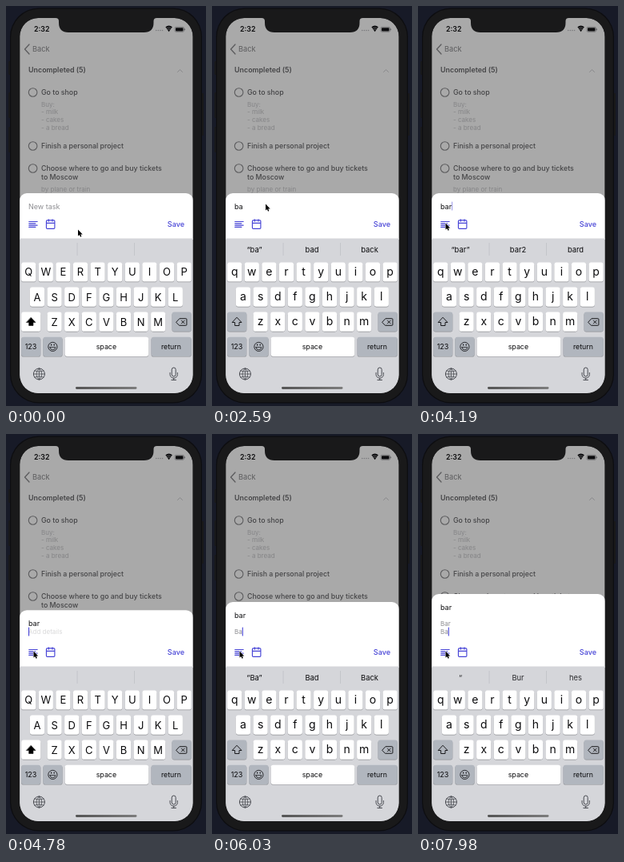
Animation of 250x500 px, one loop 8000 ms. Source, as an HTML page with a canvas:

```html
<!DOCTYPE html>
<html lang="en">
<head>
<meta charset="utf-8">
<title>Adding a task</title>
<style>
html, body { margin: 0; width: 250px; height: 500px; overflow: hidden; background: #171a27; }
canvas { display: block; width: 250px; height: 500px; }
</style>
</head>
<body>
<canvas id="stage"></canvas>
<script>
const LOOP = 8000, ACCENT = '#4643d6', INK = '#0b0b0d', BODY = '#19191a', DIM = '#a9a9a9';
const SCREEN = [17.2, 15, 216.4, 469, 23];
const canvas = document.getElementById('stage');
const ctx = canvas.getContext('2d');
const ratio = window.devicePixelRatio || 1;
canvas.width = 250 * ratio;
canvas.height = 500 * ratio;

// Timelines: [start, value...]
const TITLE = [[0, ''], [1740, 'b'], [2040, 'ba'], [2740, 'bar']];
const DETAILS = [[0, null], [4640, ''], [5330, 'B'], [5680, 'Ba'], [6330, 'Bar'],
  [7130, 'Bar\n'], [7330, 'Bar\nB'], [7830, 'Bar\nBa']];
const CAPS = [[0, true], [1740, false], [4780, true], [5330, false], [7130, true], [7330, false]];
const HINTS = [[40, 'I', 'The', 'I’m'], [1740], [1840, '“b”', 'but', 'be'],
  [2140, '“ba”', 'bad', 'back'], [2790, '“bar”', 'bar2', 'bard'], [4690],
  [4840, 'I', 'The', 'I’m'], [5330], [5430, '“B”', 'But', 'Be'], [5780, '“Ba”', 'Bad', 'Back'],
  [6530, '“Bar”', 'Bar2', 'Bard'], [7130, 'I', 'The', 'I’m'],
  [7330], [7430, '“B”', 'But', 'By'], [7880, '“', 'Bur', 'hes']];
const TOUCHES = [-560, 1740, 2040, 2740, 4780, 5330, 5680, 6330, 7130, 7330, 7830];
// Pointer moves: [start, end, x, y]
const MOVES = [[40, 440, 69, 260], [890, 1090, 67, 247.5], [3090, 3300, 61, 254.5], [3300, 3890, 34.5, 271.5]];

const clamp = v => Math.max(0, Math.min(1, v));
const smooth = p => p * p * (3 - 2 * p);
const current = (list, t) => list.filter(e => e[0] <= t).pop();

function text(str, x, y, size, color, weight = 400, align = 'left') {
  ctx.font = `${weight} ${size}px Inter, "Open Sans", sans-serif`;
  ctx.textAlign = align;
  ctx.fillStyle = color;
  ctx.fillText(str, x, y);
  return ctx.measureText(str).width;
}

function box(x, y, w, h, r, color) {
  ctx.beginPath();
  ctx.roundRect(x, y, w, h, r);
  ctx.fillStyle = color;
  ctx.fill();
}

// Strokes or fills SVG path data placed at x, y
function shape(data, x, y, scale, { stroke, fill, width = 1 }) {
  const path = new Path2D(data);
  ctx.save();
  ctx.translate(x, y);
  ctx.scale(scale, scale);
  ctx.lineWidth = width / scale;
  ctx.lineCap = ctx.lineJoin = 'round';
  if (stroke) { ctx.strokeStyle = stroke; ctx.stroke(path); }
  if (fill) { ctx.fillStyle = fill; ctx.fill(path); }
  ctx.restore();
}

function ring(x, y, r, color, width) {
  ctx.beginPath();
  ctx.arc(x, y, r, 0, 7);
  ctx.strokeStyle = color;
  ctx.lineWidth = width;
  ctx.stroke();
}

function drawPhone() {
  box(0, 0, 250, 500, 0, '#171a27');
  for (const [y, h] of [[69, 17], [108, 32], [151, 32]]) box(3.2, y, 4, h, 1, BODY);
  box(243, 109, 4, 53, 1, BODY);
  box(5, 2.5, 240, 494, 36, '#0d0d10');
  box(6.2, 3.7, 237.6, 491.6, 35, BODY);
}

function drawTasks() {
  const dark = '#454547', soft = '#858587';
  box(...SCREEN, DIM);
  text('2:32', 35, 32.2, 8.8, INK, 600);
  for (let i = 0; i < 4; i++) box(187 + i * 2.6, 29.8, 1.5, 1.5, 0.7, '#77777a');
  shape('M-5-4A7 7 0 0 1 5-4L0 3Z', 203.6, 29.6, 0.85, { fill: INK });
  for (const r of [3.1, 5.2]) {
    ctx.beginPath();
    ctx.arc(203.6, 32.2, r, -2.4, -0.74);
    ctx.strokeStyle = DIM;
    ctx.lineWidth = 0.5;
    ctx.stroke();
  }
  ctx.beginPath();
  ctx.roundRect(211, 26.3, 11.5, 6, 1.5);
  ctx.strokeStyle = '#5c5c5e';
  ctx.lineWidth = 0.6;
  ctx.stroke();
  box(212, 27.2, 9.5, 4.2, 0.8, INK);
  box(223, 28.3, 0.9, 2, 0.4, '#5c5c5e');

  shape('M5.5-6L0 0L5.5 6', 23.5, 54, 1, { stroke: '#5c5c5e', width: 1.3 });
  text('Back', 33, 57.3, 9.2, '#5c5c5e');
  text('Uncompleted (5)', 28, 83.4, 8.9, dark, 600);
  shape('M-3 1.5L0-1.5L3 1.5', 217.5, 81, 1, { stroke: soft, width: 0.9 });
  for (const y of [108, 175, 203]) ring(33.6, y, 5.3, '#5c5c5e', 1.1);
  text('Go to shop', 44, 111.2, 8.8, dark, 500);
  ['Buy:', '- milk', '- cakes', '- a bread'].forEach((s, i) => text(s, 44, 125.8 + i * 9.6, 8, soft));
  text('Finish a personal project', 44, 178.2, 8.8, dark, 500);
  text('Choose where to go and buy tickets', 44, 206.2, 8.8, dark, 500);
  text('to Moscow', 44, 217.4, 8.8, dark, 500);
  text('by plane or train', 44, 231.8, 8, soft);

  // Notch
  shape('M62 14V15Q66 15 66 19V21Q66 33 78 33H172.500Q184.500 33 184.500 21V19Q184.500 15 188.500 15V14Z', 0, 0, 1, { fill: BODY });
}

function drawSheet(t) {
  const rise = clamp((t - 4640) / 400);
  const top = t < 7130 ? 234 - 24 * rise * (2 - rise) : 200;
  const title = current(TITLE, t)[1], details = current(DETAILS, t)[1];
  box(17, top, 217, 292 - top, [9, 9, 0, 0], '#fff');

  let caretX = 28, caretY = 250;
  const titleWidth = text(title || 'New task', 28, top + 19.6, 9, title ? INK : '#8e8e92');
  if (title) caretX += titleWidth;
  if (details !== null) {
    const lines = details.split('\n');
    ctx.globalAlpha = rise;
    lines.forEach((line, i) => {
      const width = text(line || (i ? '' : 'Add details'), 28, 250 - (lines.length - 1 - i) * 9.6, 8, '#8e8e92');
      caretX = 28 + (line ? width : 0);
    });
    caretY = 247;
  }

  const phase = (t - TOUCHES.filter(v => v <= t).pop()) % 1000;
  ctx.globalAlpha = clamp(Math.max((500 - phase) / 100, (phase - 900) / 100));
  box(caretX, caretY - 5.5, 1.1, 11, 0.5, ACCENT);
  ctx.globalAlpha = 1;

  const icon = { stroke: ACCENT, width: 1.15 };
  shape('M3 6H21M3 10H17M3 14H21M3 18H17', 27, 266, 0.58, icon);
  shape('M5 4H19a2 2 0 0 1 2 2V20a2 2 0 0 1-2 2H5a2 2 0 0 1-2-2V6a2 2 0 0 1 2-2ZM16 2V6M8 2V6M3 10H21', 48.7, 265.6, 0.58, icon);
  text('Save', 201.8, 276.2, 9.1, ACCENT, 500);
}

function drawHints(t) {
  const hints = current(HINTS, t);
  for (const x of [89, 160.5]) box(x - 0.3, 296, 0.7, 16, 0, '#bcbec3');
  if (!hints) return;
  ctx.globalAlpha = clamp((t - hints[0]) / 120);
  hints.slice(1).forEach((s, i) => text(s, 53 + i * 72, 308.2, 9.4, INK, 400, 'center'));
  ctx.globalAlpha = 1;
}

function key(x, y, w, color) {
  box(x, y + 0.7, w, 24.2, 2.9, '#8f9195');
  box(x, y, w, 24.2, 2.9, color);
}

function drawKeyboard(t) {
  const caps = current(CAPS, t)[1], grey = '#b1b6be', icon = '#3c3e44';
  box(17, 290.5, 217, 194, 0, '#d5d6da');
  drawHints(t);
  ctx.translate(0.4, 0);

  ['qwertyuiop', 'asdfghjkl', 'zxcvbnm'].forEach((row, r) => {
    const y = 320.4 + r * 31.1, start = 27.8 + [0, 10.8, 32.4][r];
    [...row].forEach((c, i) => {
      const x = start + i * 21.6;
      key(x - 9.1, y, 18.2, '#fff');
      text(caps ? c.toUpperCase() : c, x, y + (caps ? 17 : 16.2), caps ? 13 : 14, INK, 400, 'center');
    });
  });

  key(18.7, 382.6, 24.2, caps ? '#fff' : grey);
  shape('M0-5.5L5.7 .5H2.7V4.5H-2.7V.5H-5.7Z', 30.9, 395, 1,
    caps ? { fill: '#000', stroke: '#000', width: 0.5 } : { stroke: INK, width: 0.9 });
  key(207.1, 382.6, 24.2, grey);
  shape('M-6.5 0L-2.5-4.3H5.5Q6.5-4.3 6.5-3.3V3.3Q6.5 4.3 5.5 4.3H-2.5ZM0-1.9L3.8 1.9M3.8-1.9L0 1.9',
    219, 395, 1, { stroke: INK, width: 0.9 });

  key(18.7, 413.7, 24.2, grey);
  text('123', 30.6, 429.2, 9, INK, 400, 'center');
  key(46, 413.7, 24.2, grey);
  ring(58, 425.9, 5.6, INK, 0.8);
  shape('M-3.4 .6H3.4A3.4 3.2 0 0 1-3.4 .6Z', 58, 426, 1, { stroke: INK, width: 0.7 });
  for (const x of [55.6, 59.2]) box(x, 422.6, 1.2, 1.9, 0.6, INK);
  key(73.2, 413.7, 104.6, '#fff');
  text('space', 125, 429, 8.9, INK, 400, 'center');
  key(181.2, 413.7, 50.1, grey);
  text('return', 206, 429, 8.8, INK, 400, 'center');

  ring(41, 460, 7, icon, 0.9);
  shape('M0-7V7M-7 0H7M0-7C-4.5-4-4.5 4 0 7C4.5 4 4.5-4 0-7M-5.6-4Q0-1.5 5.6-4M-5.6 4Q0 1.5 5.6 4',
    41, 460, 1, { stroke: icon, width: 0.7 });
  shape('M-2.5-5a2.5 2.5 0 0 1 5 0V1a2.5 2.5 0 0 1-5 0ZM-4.7-1V1a4.7 4.7 0 0 0 9.4 0V-1M0 5.7V8M-2.8 8H2.8',
    209.3, 459.5, 1, { stroke: icon, width: 0.9 });

  const bar = ctx.createLinearGradient(87, 0, 163, 0);
  bar.addColorStop(0, '#555');
  bar.addColorStop(1, '#7c7c7c');
  box(86.6, 476, 76.5, 2.9, 1.4, bar);
}

function drawPointer(t) {
  let x = 90, y = 279.5;
  for (const [from, to, tx, ty] of MOVES) {
    const p = smooth(clamp((t - from) / (to - from)));
    x += (tx - x) * p;
    y += (ty - y) * p;
  }
  shape('M0 0V9.2L2.1 7.3L3.5 10.5L5 9.8L3.6 6.7H6.5Z', x, y, 0.88, { stroke: '#fff', width: 0.9, fill: '#000' });
}

function draw(now) {
  const t = now % LOOP;
  ctx.setTransform(ratio, 0, 0, ratio, 0, 0);
  drawPhone();
  ctx.save();
  ctx.beginPath();
  ctx.roundRect(...SCREEN);
  ctx.clip();
  drawTasks();
  drawSheet(t);
  drawKeyboard(t);
  ctx.restore();
  drawPointer(t);
}

let began;
function tick(now) {
  began ??= now;
  draw(now - began);
  requestAnimationFrame(tick);
}
draw(0);
requestAnimationFrame(tick);
</script>
</body>
</html>
```
